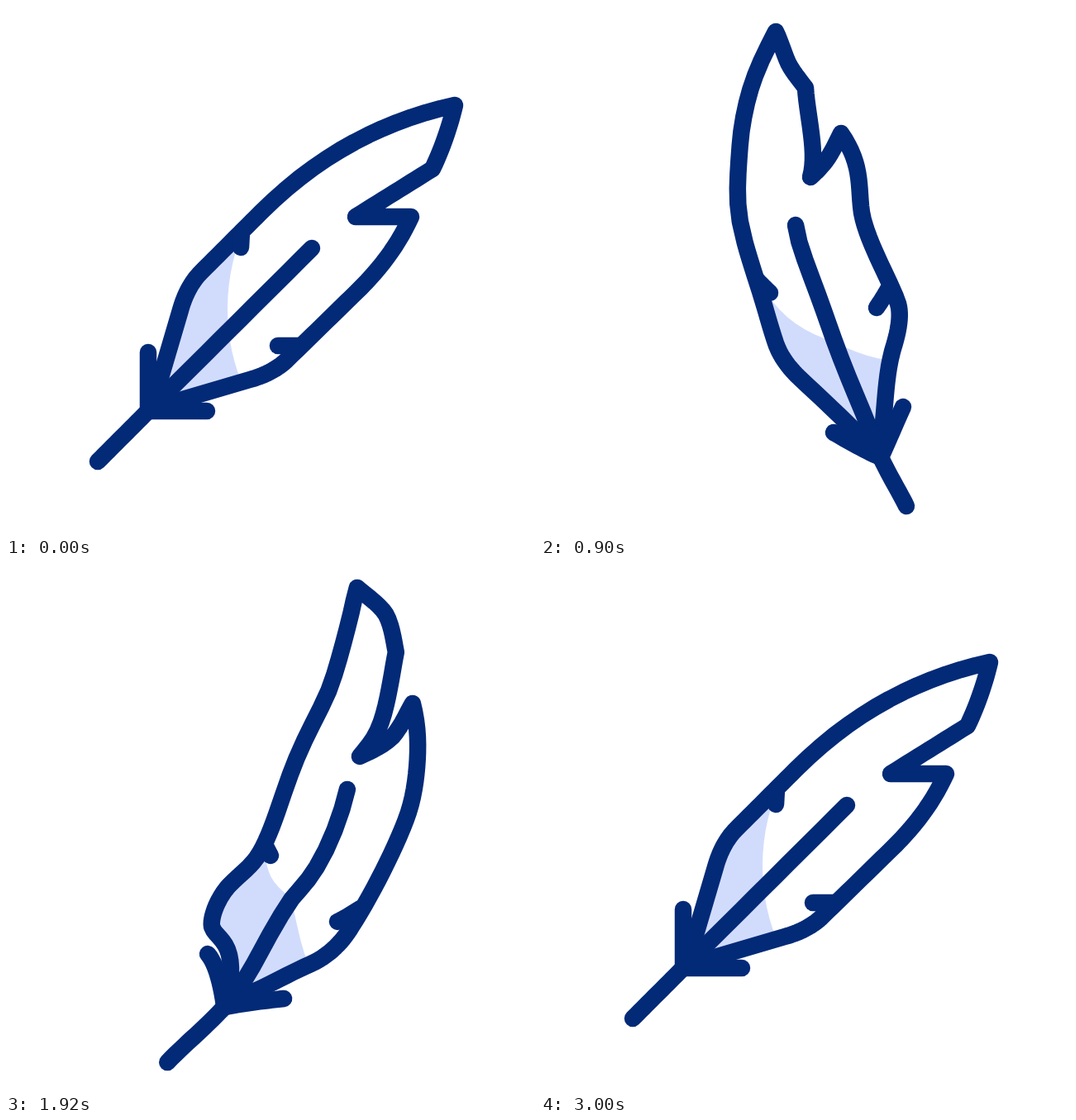
Recreate the animation shown at these times as an HTML page with a canvas. Size 640 by 640 pixels, loop 3220 ms.

```html
<!DOCTYPE html>
<html lang="en">
<head>
<meta charset="utf-8">
<title>Feather</title>
<style>
html, body { margin: 0; width: 100%; height: 100%; overflow: hidden; background: #fff; }
canvas { display: block; width: 640px; height: 640px; }
</style>
</head>
<body>
<canvas id="stage" width="640" height="640"></canvas>
<script>
const INK = '#032a77', TINT = '#d1dcfd';
const LOOP = 3220, STEP = 20, PIVOT = 320, LIFT = 5;

// Landmarks per pose: quill end, barb joint, two barb ends, shaft middle and top,
// tip, tip edge, notch edge, notch, notch lip, lower corner, two nicks,
// left side upwards, right side upwards.
const REST = [[111,551],[172,490],[172,419],[243,490],[270,393],[370,293],
  [543,120],[531,159],[516,197],[423,255],[456,255],[490,255],[284,292],[329,411],
  [211,368],[236,322],[316,242],[420,164],[295,452],[341,427],[423,347]];
const RIGHT = [[442,605],[411,546],[354,516],[438,485],[356,407],[308,265],
  [284,31],[299,70],[320,99],[326,207],[347,184],[363,154],[277,347],[406,365],
  [316,453],[284,408],[243,272],[241,152],[425,418],[432,360],[388,250]];
const LEFT = [[195,604],[264,537],[244,473],[336,527],[345,408],[413,274],
  [425,30],[459,62],[472,108],[428,234],[467,211],[492,170],[320,354],[401,434],
  [249,440],[270,390],[332,290],[389,155],[375,482],[418,440],[487,302]];

const SIDE = 'M176 487 L211 368 C216 350 224 334 236 322';
const OUTLINE = SIDE + ' L308 250 C380 178 460 138 543 120 C537 146 527 174 516 197' +
  ' L423 255 L490 255 C474 290 452 319 423 347 L341 427 C329 439 313 447 295 452 L176 487';
const SHADE = SIDE + ' L287 272 C262 330 262 400 285 455 L176 487';
const LINES = [OUTLINE, 'M111 551 L172 490 L370 293', 'M172 419 L172 490 L243 490',
  'M284 292 L285 274', 'M329 411 L354 411'];

// --- smooth warp driven by the landmarks (thin plate spline) ---
const kernel = (a, b) => {
  const d = ((a[0] - b[0]) ** 2 + (a[1] - b[1]) ** 2) / 1e4;
  return d ? d * Math.log(d) : 0;
};
const basis = p => [...REST.map(q => kernel(p, q)), 1, p[0] / 100, p[1] / 100];

function invert(m) {
  const n = m.length;
  const a = m.map((row, i) => [...row, ...row.map((_, j) => +(i === j))]);
  for (let c = 0; c < n; c++) {
    let best = c;
    for (let r = c + 1; r < n; r++) if (Math.abs(a[r][c]) > Math.abs(a[best][c])) best = r;
    [a[c], a[best]] = [a[best], a[c]];
    const pivot = a[c][c];
    a[c] = a[c].map(v => v / pivot);
    for (let r = 0; r < n; r++) {
      const f = a[r][c];
      if (r !== c && f) a[r] = a[r].map((v, j) => v - f * a[c][j]);
    }
  }
  return a.map(row => row.slice(n));
}

const rows = REST.map(basis);
const tail = [0, 1, 2].map(k => [...rows.map(r => r[REST.length + k]), 0, 0, 0]);
const inverse = invert([...rows, ...tail]);

function weights(p) {
  const b = basis(p);
  return REST.map((_, i) => inverse[i].reduce((s, v, j) => s + v * b[j], 0));
}

// Turns a path into many points, each kept as weights on the landmarks.
function sample(path) {
  const points = [];
  let from;
  for (const [, kind, args] of path.matchAll(/([MLC])([\d ]+)/g)) {
    const n = args.trim().split(/ +/).map(Number);
    const end = n.slice(-2);
    if (kind === 'M') points.push(end);
    for (let i = 1; kind !== 'M' && i <= 14; i++) {
      const t = i / 14, u = 1 - t;
      points.push([0, 1].map(k => kind === 'L'
        ? u * from[k] + t * end[k]
        : u ** 3 * from[k] + 3 * u * u * t * n[k] + 3 * u * t * t * n[k + 2] + t ** 3 * end[k]));
    }
    from = end;
  }
  return points.map(weights);
}

// --- poses ---
function turn([x, y], deg) {
  const a = deg * Math.PI / 180, c = Math.cos(a), s = Math.sin(a);
  const dx = x - PIVOT, dy = y - PIVOT;
  return [PIVOT + dx * c - dy * s, PIVOT + dx * s + dy * c];
}
const pose = (marks, angle) => ({ angle, marks: marks.map(p => turn(p, -angle)) });
const rest = pose(REST, 0), right = pose(RIGHT, -60), left = pose(LEFT, -23);

function blend(a, b, m) {
  const angle = a.angle + (b.angle - a.angle) * m;
  const lift = LIFT * 4 * m * (1 - m);
  return a.marks.map((p, i) => {
    const q = b.marks[i];
    const [x, y] = turn([p[0] + (q[0] - p[0]) * m, p[1] + (q[1] - p[1]) * m], angle);
    return [x, y - lift];
  });
}

// --- timing ---
const launch = t => 1.16 * t + 0.68 * t * t - 0.84 * t ** 3;
const land = t => 1 - launch(1 - t);
const toLeft = t => 1.03 * (0.5 - 0.5 * Math.cos(Math.PI * t));
const toRight = t => 1 - toLeft(1 - t);
const STROKES = [
  [200, 900, rest, right, launch],
  [900, 1260, right, left, toLeft],
  [1260, 1600, left, right, toRight],
  [1600, 1960, right, left, toLeft],
  [1960, 2300, left, right, toRight],
  [2300, 3000, right, rest, land]
];

function marksAt(time) {
  const s = STROKES.find(([a, b]) => time >= a && time < b);
  if (!s) return REST;
  const [start, end, a, b, ease] = s;
  return blend(a, b, ease((time - start) / (end - start)));
}

// --- drawing ---
const shade = sample(SHADE), lines = LINES.map(sample);
const ctx = document.getElementById('stage').getContext('2d');
ctx.lineWidth = 20.5;
ctx.lineCap = ctx.lineJoin = 'round';
ctx.strokeStyle = INK;
ctx.fillStyle = TINT;

function trace(points, marks) {
  ctx.beginPath();
  for (const w of points) {
    let x = 0, y = 0;
    w.forEach((v, i) => { x += v * marks[i][0]; y += v * marks[i][1]; });
    ctx.lineTo(x, y);
  }
}

function draw(time) {
  const marks = marksAt(time);
  ctx.clearRect(0, 0, 640, 640);
  trace(shade, marks);
  ctx.fill();
  for (const line of lines) {
    trace(line, marks);
    ctx.stroke();
  }
}

const begin = performance.now();
function tick() {
  const time = (performance.now() - begin) % LOOP;
  draw(Math.floor(time / STEP) * STEP);
  requestAnimationFrame(tick);
}
tick();
</script>
</body>
</html>
```
